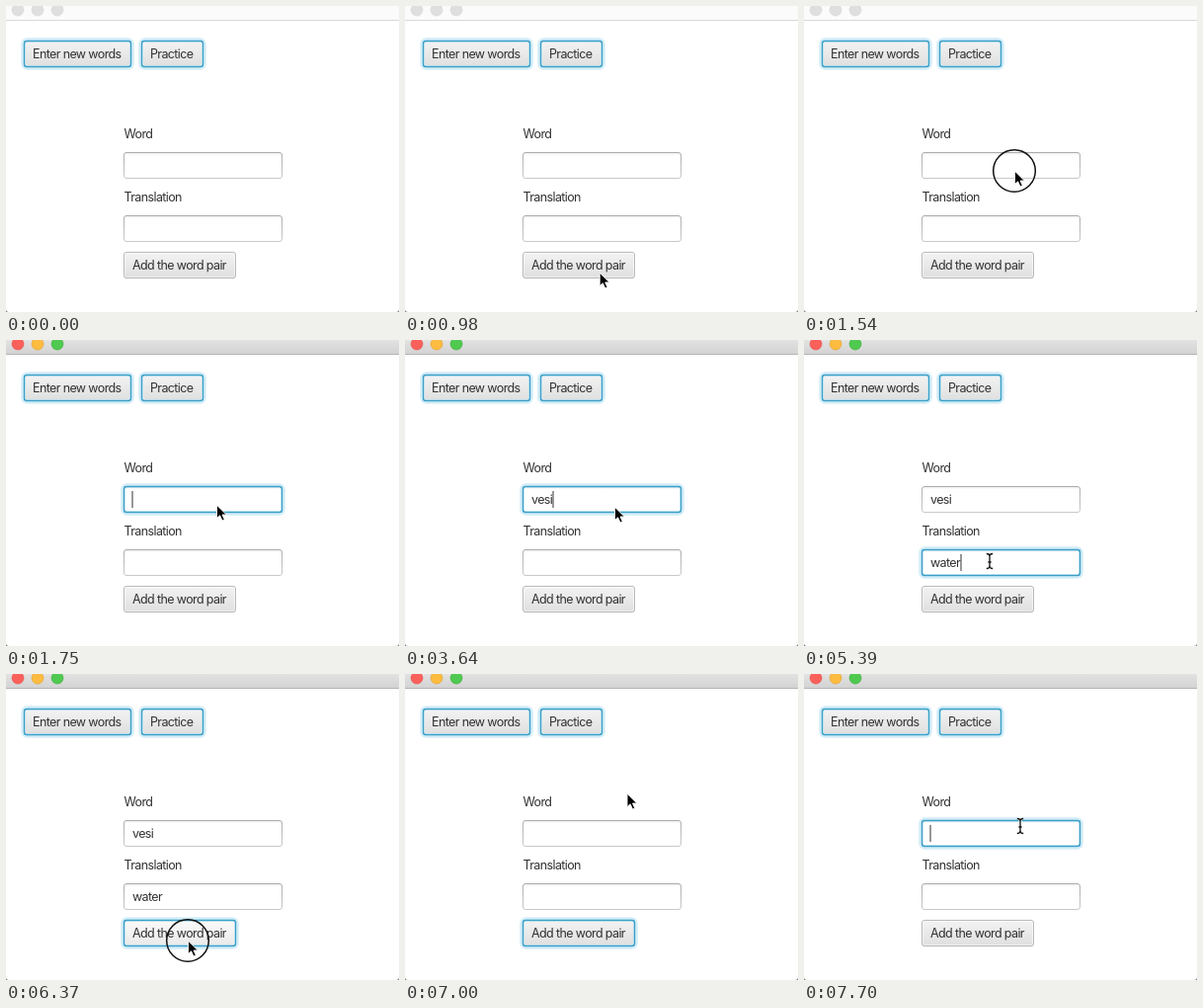
Write an HTML page that moves like this. It is 398 by 310 pixels and loops after 8 s.

```html
<!DOCTYPE html>
<html lang="en">
<head>
<meta charset="utf-8">
<title>Word trainer</title>
<style>
html, body { margin: 0; width: 100%; height: 100%; overflow: hidden; background: #fff; }
svg { display: block; width: 398px; height: 310px; }
text { font: 12.5px Inter, "Liberation Sans", sans-serif; letter-spacing: -.62px; fill: #323232; white-space: pre; }
.off { display: none; }
</style>
</head>
<body>
<svg id="stage" viewBox="0 0 398 310">
  <defs>
    <linearGradient id="face" x2="0" y2="1">
      <stop stop-color="#f3f3f3"/><stop offset="1" stop-color="#dfdfdf"/>
    </linearGradient>
    <linearGradient id="hover" x2="0" y2="1">
      <stop stop-color="#fafafa"/><stop offset="1" stop-color="#e9e9e9"/>
    </linearGradient>
    <linearGradient id="edge" x2="0" y2="1">
      <stop stop-color="#acacac"/><stop offset="1" stop-color="#c9c9c9"/>
    </linearGradient>
    <linearGradient id="inner" x2="0" y2="1">
      <stop stop-color="#ececec"/><stop offset=".12" stop-color="#fff"/>
    </linearGradient>
    <linearGradient id="bar" x2="0" y2="1">
      <stop stop-color="#e2e2e2"/><stop offset="1" stop-color="#d3d3d3"/>
    </linearGradient>
    <clipPath id="pairClip"><path d="M120 250H225.3V276H120Z"/></clipPath>
  </defs>
  <rect width="398" height="310" fill="#fff"/>
  <g id="chrome"></g>
  <g id="form"></g>
  <rect id="caret" width="1" height="17" fill="#333"/>
  <circle id="ring" r="21.3" fill="none" stroke="#111" stroke-width="1.5"/>
  <path id="arrow" d="M.5 .3V13.6L3.6 10.8L6 16L8.3 15L6 10H10.4Z" fill="#000" stroke="#fff" stroke-width=".9"/>
  <g id="beam" fill="none">
    <path d="M.8 -3.5Q4 -3.5 4 -1V9Q4 11.5 .8 11.5M7.2 -3.5Q4 -3.5 4 -1M4 9Q4 11.5 7.2 11.5M2.4 5H5.6" stroke="#fff" stroke-width="2.6"/>
    <path d="M.8 -3.5Q4 -3.5 4 -1V9Q4 11.5 .8 11.5M7.2 -3.5Q4 -3.5 4 -1M4 9Q4 11.5 7.2 11.5M2.4 5H5.6" stroke="#111" stroke-width="1.3"/>
  </g>
</svg>
<script>
const LOOP = 8000, TICK = 70;
const $ = id => document.getElementById(id);

function add(parent, tag, attrs, label) {
  const el = document.createElementNS("http://www.w3.org/2000/svg", tag);
  for (const k in attrs) el.setAttribute(k, attrs[k]);
  if (label) el.textContent = label;
  return parent.appendChild(el);
}
const box = (parent, x, y, width, height, attrs) =>
  add(parent, "rect", { x, y, width, height, rx: 2.5, ...attrs });
const show = (el, on) => el.classList.toggle("off", !on);

const form = $("form"), chrome = $("chrome");

// Title bar
const bar = add(chrome, "rect", { width: 398, height: 14 });
const rule = add(chrome, "rect", { y: 14, width: 398, height: 1 });
const lights = [12, 32, 52].map(cx => add(chrome, "circle", { cx, cy: 4, r: 6 }));
add(chrome, "path", { d: "M0 307V310H3Q0 310 0 307ZM398 307V310H395Q398 310 398 307Z", fill: "#777" });

function focusRing(x, y, w, h) {
  const g = add(form, "g", { fill: "none" });
  box(g, x - .5, y - .5, w + 1, h + 1, { stroke: "#d3edf8", "stroke-width": 4.5, rx: 4 });
  box(g, x + .5, y + .5, w - 1, h - 1, { stroke: "#3c9fc6", "stroke-width": 1.4 });
  return g;
}

function button(x, y, w, label, attrs) {
  box(form, x + .5, y + 1.5, w - 1, 26, { fill: "#ededed" });
  const face = box(form, x + .5, y + .5, w - 1, 26, { fill: "url(#face)", stroke: "#b9b9b9" });
  box(form, x + 1.5, y + 1.5, w - 3, 24, { fill: "none", stroke: "#fff", opacity: .5, rx: 2 });
  const ring = focusRing(x, y, w, 27);
  add(form, "text", { x: x + 9, y: y + 18, ...attrs }, label);
  return { face, ring };
}

function field(y, label) {
  add(form, "text", { x: 119.5, y: y - 14 }, label);
  box(form, 119.5, y + .5, 160, 26, { fill: "url(#inner)", stroke: "url(#edge)" });
  return { ring: focusRing(119, y, 161, 27), text: add(form, "text", { x: 128, y: y + 18 }) };
}

button(18, 35, 109, "Enter new words");
button(137, 35, 63, "Practice");
const word = field(148, "Word");
const trans = field(212, "Translation");
const addBtn = button(119, 249, 114, "Add the word pair", { "clip-path": "url(#pairClip)" });

// Pointer hot spot: time, x, y
const path = [
  [770, 191, 306], [1400, 213, 167], [3570, 213, 167], [3640, 212, 169],
  [4060, 184, 220], [5810, 184, 220], [6090, 184, 270], [6720, 184, 270],
  [7000, 224.5, 121], [7140, 224, 124], [7490, 215, 150]
];
const clicks = [[1540, 1750], [4130, 4200], [6370, 6440], [7560, 7700]];

// Keystrokes: time, text, caret x
const wordKeys = [[1680, "", 127.5], [2240, "v", 134], [2660, "ve", 141], [3150, "ves", 147], [3290, "vesi", 149.5],
  [6440, "", 127.5]];
const transKeys = [[4130, "", 127.5], [4620, "w", 137], [4760, "wa", 144], [4970, "wat", 148],
  [5320, "wate", 155], [5390, "water", 158.5], [6440, "", 127.5]];
const focusSteps = [[0, null], [1680, word], [4130, trans], [6370, addBtn], [7560, word]];

const latest = (steps, t) => steps.filter(s => s[0] <= t).pop() || [0, "", 127.5];

function pointer(t) {
  const i = path.findIndex(p => p[0] > t);
  if (i < 0) return path[path.length - 1].slice(1);
  const [t0, x0, y0] = path[i - 1], [t1, x1, y1] = path[i];
  const k = (t - t0) / (t1 - t0), e = k * k * (3 - 2 * k);
  return [x0 + (x1 - x0) * e, y0 + (y1 - y0) * e];
}

function draw(time) {
  const t = Math.floor((time % LOOP) / TICK) * TICK;

  const active = t >= 1610;
  bar.setAttribute("fill", active ? "url(#bar)" : "#fbfbfb");
  rule.setAttribute("fill", active ? "#b4b4b4" : "#d9d9d9");
  const tones = active ? ["#fc605b", "#fdbc40", "#4fc94f"] : ["#dfdfdf", "#dfdfdf", "#dfdfdf"];
  const rims = active ? ["#e2504b", "#e0a030", "#3cae3c"] : ["#d6d6d6", "#d6d6d6", "#d6d6d6"];
  lights.forEach((c, i) => {
    c.setAttribute("fill", tones[i]);
    c.setAttribute("stroke", rims[i]);
    c.setAttribute("stroke-width", .6);
  });

  const focus = latest(focusSteps, t)[1];
  for (const part of [word, trans, addBtn]) show(part.ring, part === focus);

  const w = latest(wordKeys, t), tr = latest(transKeys, t);
  word.text.textContent = w[1];
  trans.text.textContent = tr[1];
  show($("caret"), focus === word || focus === trans);
  $("caret").setAttribute("x", focus === trans ? tr[2] : w[2]);
  $("caret").setAttribute("y", focus === trans ? 217 : 153);

  const visible = t >= 770;
  const [x, y] = visible ? pointer(t) : [0, 0];
  const inTrans = t > 3640 && y >= 212 && y < 239;
  const inWord = t > 7000 && y >= 148 && y < 175;
  const overField = inTrans && t < 6720 || inWord;
  const overBtn = y >= 249 && y < 276 && t > 5810;
  addBtn.face.setAttribute("fill", overBtn ? "url(#hover)" : "url(#face)");
  show($("arrow"), visible && !overField);
  show($("beam"), visible && overField);
  show($("ring"), clicks.some(([a, b]) => t >= a && t < b));
  for (const id of ["arrow", "beam", "ring"]) $(id).setAttribute("transform", `translate(${x} ${y})`);
}

const start = performance.now();
function loop() {
  draw(performance.now() - start);
  requestAnimationFrame(loop);
}
loop();
</script>
</body>
</html>
```
